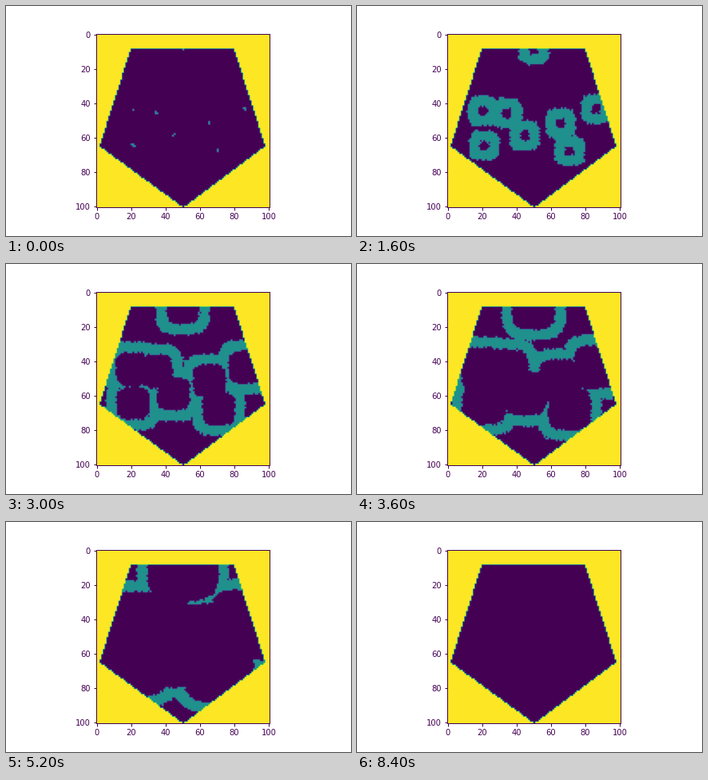
These frames come from a looping animation (432x288 px, 8800 ms). A matplotlib script:

```python
import numpy as np
import matplotlib.pyplot as plt
from matplotlib.animation import FuncAnimation

N = 101            # cells per side
BURN = 6           # steps a cell stays active
LAST = 42          # step at which everything has burnt out
STEP_MS = 200
FRAMES = 44
INK = "#440154"

# Where the fronts start, in cells
SEEDS = np.array([
    (49.8, 9), (20.2, 44.7), (34.2, 46), (44.5, 59),
    (21, 64.6), (65.2, 51.8), (70.5, 67.7), (85.8, 43.5),
])


def pentagon(x, y):
    """Mask of a pentagon standing on its tip, edges rounded to cells."""
    a = np.pi / 2 + 2 * np.pi * np.arange(5) / 5
    px = np.floor(50 + 50 * np.cos(a) + 1e-9)
    py = np.floor(50 + 50 * np.sin(a) + 1e-9)
    inside = np.ones(x.shape, bool)
    for x0, y0, dx, dy in zip(px, py, np.roll(px, -1) - px, np.roll(py, -1) - py):
        side = dx * (y - y0) - dy * (x - x0)
        inside &= side >= -0.5 * max(abs(dx), abs(dy))
    return inside


def arrival_times(x, y, power=3.5, start=0.7, rough=0.6):
    """Step at which a rounded-square front reaches each cell."""
    rng = np.random.default_rng(4)
    dx = np.abs(x[..., None] - SEEDS[:, 0])
    dy = np.abs(y[..., None] - SEEDS[:, 1])
    dist = ((dx ** power + dy ** power) ** (1 / power)).min(axis=-1)
    t = dist - start + rng.uniform(-rough, rough, dist.shape)
    return np.clip(t, 0, LAST - BURN)


yy, xx = np.mgrid[0:N, 0:N].astype(float)
inside = pentagon(xx, yy)
arrival = arrival_times(xx, yy)


def grid(step):
    active = (arrival <= step) & (step < arrival + BURN)
    return np.where(inside, active.astype(float), 2.0)


fig, ax = plt.subplots(figsize=(6, 4), dpi=72, facecolor="white")
fig.subplots_adjust(left=0.125, right=0.9, bottom=0.125, top=0.88)
image = ax.imshow(grid(0), cmap="viridis", vmin=0, vmax=2,
                  interpolation="antialiased", interpolation_stage="data")
ticks = range(0, N, 20)
ax.set_xticks(ticks)
ax.set_yticks(ticks)
ax.tick_params(color=INK, labelcolor=INK, labelsize=10, width=1,
               labelfontfamily="DejaVu Sans")
for spine in ax.spines.values():
    spine.set(color=INK, linewidth=1)


def update(i):
    image.set_data(grid(min(i, LAST)))
    return [image]


anim = FuncAnimation(fig, update, frames=FRAMES, interval=STEP_MS,
                     repeat=True, repeat_delay=0, blit=False)
plt.show()
```
